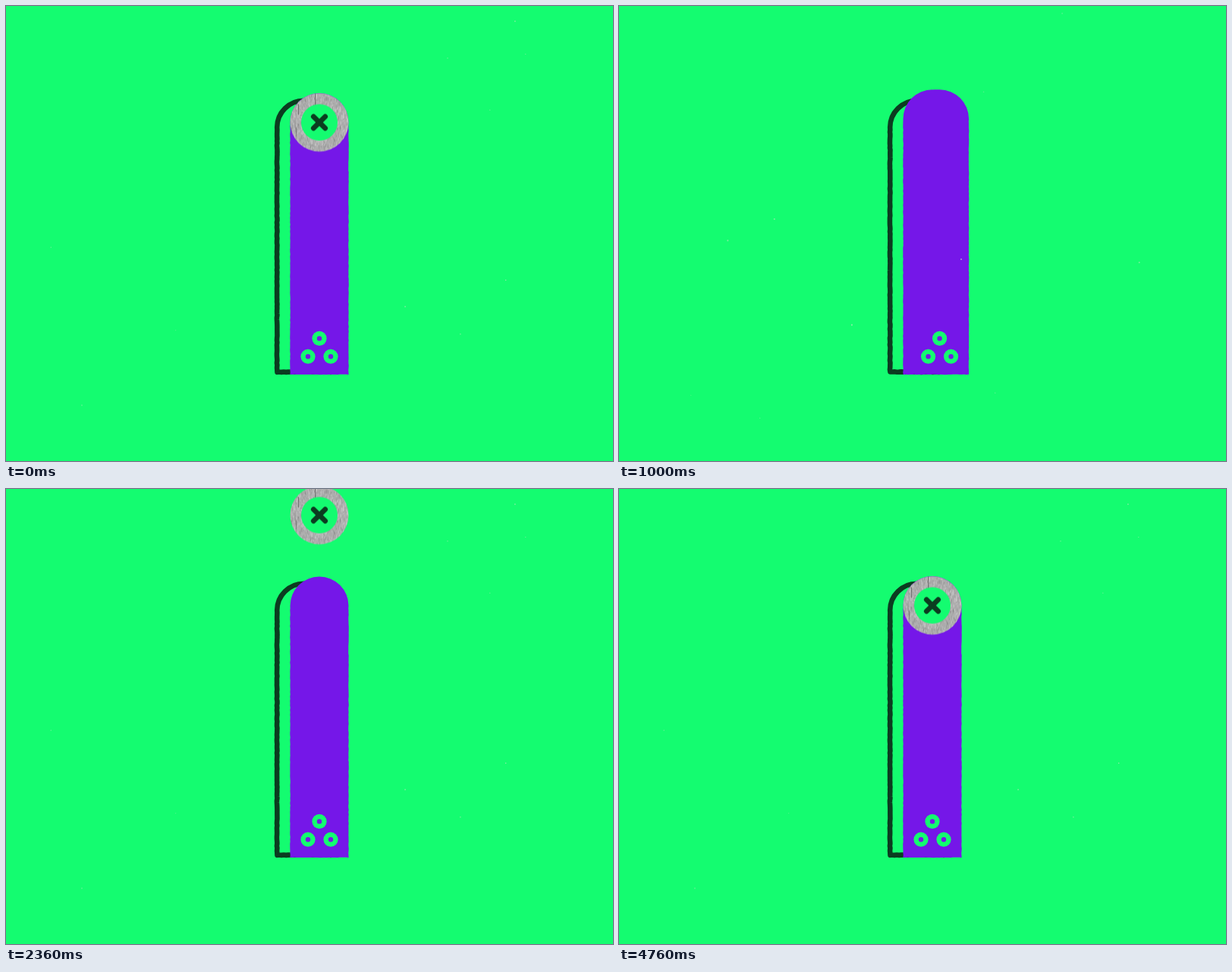
An HTML page with a canvas that plays this animation: 800 by 600 pixels, repeating every 4840 ms.

```html
<!DOCTYPE html>
<html lang="en">
<head>
<meta charset="utf-8">
<title>Bar and ring</title>
<style>
html, body { margin: 0; width: 100%; height: 100%; overflow: hidden; background: #14fc70; }
canvas { display: block; }
</style>
</head>
<body>
<canvas width="800" height="600"></canvas>
<script>
const ctx = document.querySelector('canvas').getContext('2d');
const GREEN = '#14fc70', PURPLE = '#7517e8', DARK = '#0b3c20';
const LOOP = 4840, STEP = 40, FLOOR = 486, RADIUS = 38.5, CX = 413;
const REST = 153.5, CRUSHED = 404, OUTLINE_TOP = 121.5;

function ease(t, from, to) {
  const p = Math.max(0, Math.min(1, (t - from) / (to - from)));
  return p * p * (3 - 2 * p);
}

// Released at u = 0 from 1, swings around 0 and dies out
function spring(u, period, decay) {
  return u <= 0 ? 1 : Math.exp(-decay * u) * Math.cos(2 * Math.PI * u / period);
}

function random(seed) {
  let s = seed * 7919 + 17;
  return () => {
    s = (s + 0x6D2B79F5) | 0;
    let n = Math.imul(s ^ (s >>> 15), 1 | s);
    n ^= n + Math.imul(n ^ (n >>> 7), 61 | n);
    return ((n ^ (n >>> 14)) >>> 0) / 4294967296;
  };
}

// The ring drops through the bar, shoots back up to hover, then lands on the bar and bounces
function ringHeight(t) {
  if (t < 1360) return REST + 524.5 * ease(t, 400, 720);
  return REST - 119 * spring(t - 2560, 480, .00405) + 643.5 * (1 - ease(t, 1360, 1480));
}

// The bar is crushed by the ring, springs back, and later rides the landing ring
function barTop(t, ringTop) {
  if (t < 720) return Math.min(CRUSHED, ringTop);
  if (t > 2800) return ringTop;
  const free = OUTLINE_TOP + (CRUSHED - OUTLINE_TOP) * spring(t - 720, 480, .011) - 6 * ease(t, 1360, 1480);
  return t > 2560 ? Math.max(free, ringTop) : free;
}

function disc(c, x, y, r, color) {
  c.fillStyle = color;
  c.beginPath();
  c.arc(x, y, r, 0, 7);
  c.fill();
}

// Upright bar with a rounded top and slightly uneven edges
function barPath(left, top, right, bottom, corner, rnd) {
  const r = Math.max(0, Math.min(corner, (right - left) / 2, bottom - top));
  const wobble = () => (rnd() - .5) * .6;
  const line = (x0, y0, x1, y1) => {
    const n = Math.ceil(Math.hypot(x1 - x0, y1 - y0) / 3);
    for (let i = 0; i < n; i++) {
      ctx.lineTo(x0 + (x1 - x0) * i / n + wobble(), y0 + (y1 - y0) * i / n + wobble());
    }
  };
  ctx.beginPath();
  line(right, bottom, left, bottom);
  line(left, bottom, left, top + r);
  ctx.arc(left + r, top + r, r, Math.PI, Math.PI * 1.5);
  line(left + r, top, right - r, top);
  ctx.arc(right - r, top + r, r, Math.PI * 1.5, Math.PI * 2);
  line(right, top + r, right, bottom);
  ctx.closePath();
}

function makeRing() {
  const canvas = document.createElement('canvas');
  canvas.width = canvas.height = 80;
  const c = canvas.getContext('2d'), rnd = random(5);
  disc(c, 40, 40, RADIUS, '#adadad');
  c.globalCompositeOperation = 'source-atop';
  for (let i = 0; i < 1500; i++) {
    const v = 115 + rnd() * 115;
    c.fillStyle = `rgba(${v},${v},${v},.5)`;
    c.fillRect(rnd() * 80, rnd() * 80, 1, 1 + rnd() * 5);
  }
  c.fillStyle = '#606060';
  for (let i = 0; i < 7; i++) c.fillRect(rnd() * 80, rnd() * 80, .8, 8 + rnd() * 14);
  disc(c, 40, 40, 24, GREEN);
  c.strokeStyle = DARK;
  c.lineWidth = 6.8;
  c.lineCap = 'round';
  c.beginPath();
  for (const d of [-7.7, 7.7]) {
    c.moveTo(40 - 7.7, 40 - d);
    c.lineTo(40 + 7.7, 40 + d);
  }
  c.stroke();
  return canvas;
}
const ring = makeRing();

function draw(t) {
  const rnd = random(Math.floor((t + 40) / 80) % 30 + 1);
  const ringY = ringHeight(t);
  const top = barTop(t, ringY - RADIUS);
  const squash = ease(t, 400, 520) * (1 - ease(t, 680, 960));
  const corner = RADIUS * (1 - squash);
  const left = 374.5 + 15 * squash;
  const right = 451.5 + 350 * ease(t, 400, 560) * spring(t - 560, 400, .0077);

  ctx.fillStyle = GREEN;
  ctx.fillRect(0, 0, 800, 600);

  ctx.strokeStyle = DARK;
  ctx.lineWidth = 6.6;
  ctx.lineJoin = 'round';
  barPath(left - 17.3, Math.max(OUTLINE_TOP, top) + 3.2, left + 53.5, 482.6, corner - 3, rnd);
  ctx.stroke();

  ctx.fillStyle = PURPLE;
  barPath(left, top, right, FLOOR, corner, rnd);
  ctx.fill();

  for (let i = -1; i <= 1; i++) {
    const x = right - RADIUS + 15 * i, y = i ? 462.2 : 438.4;
    disc(ctx, x, y, 9.6, GREEN);
    disc(ctx, x, y, 3.2, PURPLE);
  }
  ctx.drawImage(ring, CX - 40, ringY - 40);

  for (let i = 0; i < 10; i++) {
    ctx.globalAlpha = .25 + rnd() * .5;
    disc(ctx, 5 + rnd() * 781, 7 + rnd() * 554, .5 + rnd() * .6, '#d5e6c8');
  }
  ctx.globalAlpha = 1;
}

function frame() {
  draw(Math.floor(performance.now() % LOOP / STEP) * STEP);
  requestAnimationFrame(frame);
}
frame();
</script>
</body>
</html>
```
